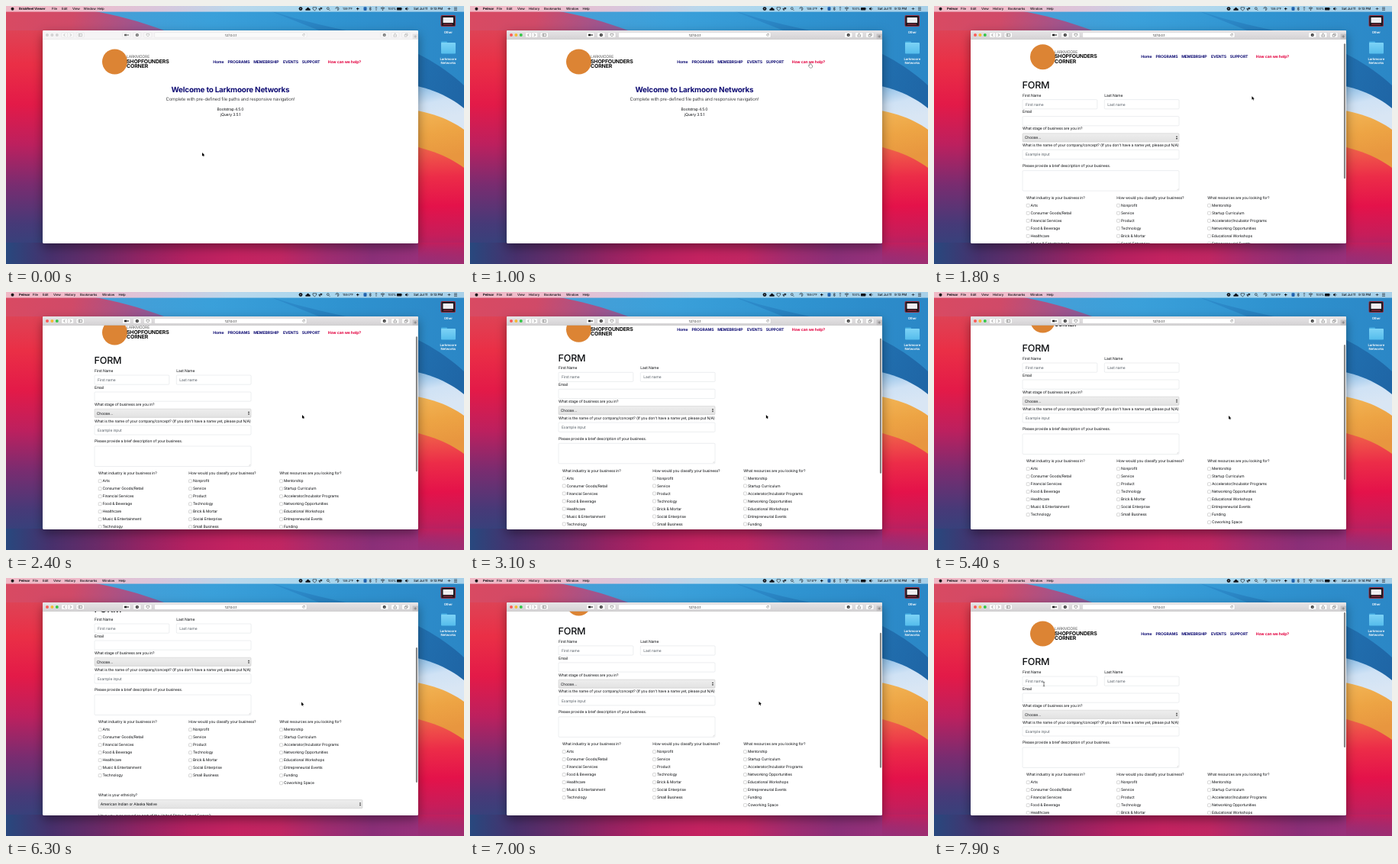
An HTML page with a canvas for the animation above (8000 ms loop, 600 px wide and 338 px high).

```html
<!DOCTYPE html>
<html lang="en">
<head>
<meta charset="utf-8">
<title>Form walkthrough</title>
<style>
html, body { margin: 0; width: 100%; height: 100%; overflow: hidden; background: #333; }
canvas { display: block; width: 600px; height: 338px; }
</style>
</head>
<body>
<canvas id="stage"></canvas>
<script>
const W = 600, H = 338, LOOP = 8000;
const canvas = document.getElementById('stage');
const ratio = window.devicePixelRatio || 1;
canvas.width = W * ratio;
canvas.height = H * ratio;
let ctx = canvas.getContext('2d');

const NAVY = '#0d0b72', INK = '#0c0e11', PINK = '#e3003f', GREY = '#596169';

function text(str, x, y, size, color = INK, weight = 400, align = 'left', track = -0.02) {
  ctx.font = `${weight} ${size}px Inter, "Open Sans", sans-serif`;
  ctx.letterSpacing = `${(track * size).toFixed(3)}px`;
  ctx.textRendering = 'geometricPrecision';
  ctx.textAlign = align;
  ctx.textBaseline = 'alphabetic';
  ctx.fillStyle = color;
  ctx.fillText(str, x, y + size * 0.36);
}

function box(x, y, w, h, r, fill, stroke, line = 0.4) {
  ctx.beginPath();
  ctx.roundRect(x, y, w, h, r);
  if (fill) { ctx.fillStyle = fill; ctx.fill(); }
  if (stroke) { ctx.strokeStyle = stroke; ctx.lineWidth = line; ctx.stroke(); }
}

function dot(x, y, r, fill) {
  ctx.beginPath();
  ctx.arc(x, y, r, 0, Math.PI * 2);
  ctx.fillStyle = fill;
  ctx.fill();
}

function path(d, color, width = 0.6) {
  ctx.strokeStyle = color;
  ctx.lineWidth = width;
  ctx.stroke(new Path2D(d));
}

function ramp(x0, y0, x1, y1, colors) {
  const g = ctx.createLinearGradient(x0, y0, x1, y1);
  colors.forEach((c, i) => g.addColorStop(i / (colors.length - 1), c));
  return g;
}

function shape(d, fill) {
  ctx.fillStyle = fill;
  ctx.fill(new Path2D(d));
}

// Keyed values: [time, value...], eased between neighbours
function keyed(keys, t) {
  let i = 0;
  while (i < keys.length - 2 && t >= keys[i + 1][0]) i++;
  const a = keys[i], b = keys[i + 1];
  const k = Math.min(1, Math.max(0, (t - a[0]) / (b[0] - a[0])));
  const e = k * k * (3 - 2 * k);
  return a.slice(1).map((v, n) => v + (b[n + 1] - v) * e);
}

function stepped(list, t) {
  return list.filter(s => s[0] <= t).pop()[1];
}

const scrollKeys = [[1500, 0], [2300, 20], [2600, 20], [3200, 24], [4500, 24], [5400, 36], [6300, 69], [6600, 69], [7500, 0]];
const mouseKeys = [[100, 257, 192], [900, 445, 75], [1400, 445, 75], [2200, 388, 161], [3000, 388, 161],
  [3800, 384.5, 160], [4600, 384.5, 160], [5300, 386, 162], [6300, 387, 162.5], [6900, 387, 162.5], [7800, 144, 139]];
const temps = [[0, '139.1°F'], [900, '138.0°F'], [2000, '159.0°F'], [3200, '137.8°F'], [5900, '138.2°F'], [7000, '137.8°F']];

function wallpaper() {
  // Sky, with a darker wave on the right
  ctx.fillStyle = ramp(100, 0, 600, 60, ['#4a9ed6', '#3aa0da', '#2f93d0', '#2b87c6']);
  ctx.fillRect(0, 0, W, H);
  shape('M330 0C380 20 440 30 480 40C530 54 570 76 600 104V150H480V60Z', ramp(340, 0, 600, 110, ['#2f8fce', '#2379b9', '#1f66a6']));
  // Warm hill on the left
  shape('M0 0H70C120 6 190 18 270 60V338H0Z', ramp(0, 0, 260, 50, ['#d94a62', '#d04a68', '#9c5590', '#5a79b8']));
  ctx.fillStyle = ramp(0, 24, 0, 338, ['#dc4658', '#ea2f46', '#e31a48', '#bd205e', '#7a2c70', '#463a78', '#28487e']);
  ctx.fillRect(0, 32, 60, 306);
  // Pale band, amber band and red slope on the right
  shape('M500 98C550 104 578 116 600 134V220H500Z', ramp(550, 104, 560, 150, ['#8fc0e8', '#cfe2f5', '#d9e6f4']));
  shape('M500 132C550 136 578 146 600 162V260H500Z', ramp(550, 136, 562, 200, ['#f2b455', '#eda444', '#e8963f']));
  shape('M500 178C550 184 578 196 600 212V338H500Z', ramp(565, 186, 570, 338, ['#f0604a', '#ec2c48', '#e4124a', '#c61d5a', '#8f2c74']));
  // Floor
  ctx.fillStyle = ramp(0, 0, 600, 0, ['#28487e', '#48306c', '#6a2a68', '#942363', '#b52060', '#c42260', '#c02662', '#a02c70', '#8a2f78', '#98307a', '#a52e70']);
  ctx.fillRect(0, 310, W, 28);
  ctx.fillStyle = ramp(0, 310, 0, 338, ['rgba(198,29,90,.9)', 'rgba(143,44,116,.3)']);
  ctx.fillRect(540, 310, 60, 28);
}

function desktopIcons() {
  box(570, 12.5, 18.5, 14, 1.2, '#1d1a22', '#a52a3c', 0.9);
  box(572.5, 15, 13.5, 7, 0.5, '#efedf0');
  box(573, 23, 12, 2, 0.5, '#70222f');
  text('Other', 579.3, 34.2, 4.3, '#fff', 600, 'center');
  box(570, 46.5, 8, 4, 1, '#49b2e5');
  box(570, 48, 19, 14.5, 1, ramp(0, 48, 0, 62, ['#7dd3f6', '#56bdec']));
  text('Larkmoore', 579.3, 69, 4.3, '#fff', 600, 'center');
  text('Networks', 579.3, 74, 4.3, '#fff', 600, 'center');
}

function statusIcons(t) {
  const c = '#10131a';
  dot(386, 3.6, 2.4, c);
  dot(386, 3.6, 0.7, '#d5e8f4');
  shape('M392.5 5.8Q391.8 3.6 393.8 3.5Q395.2 .2 397.2 3.2Q399.3 3.4 398.6 5.8Z', c);
  path('M402 1.8H406.6V4L404.3 6L402 4Z', c);
  path('M409.5 3.8H414M411.5 2.3L414.3 2.8M410 4.8L412 5.2', c, 1);
  path('M420.4 3.2A1.4 1.4 0 1 0 423.2 3.2A1.4 1.4 0 1 0 420.4 3.2M423 4.5L424.5 6', c);
  path('M431.8 3.6A2.1 2.1 0 1 1 434 5.7M434 2.3V3.8L435 4.4', c);
  text(stepped(temps, t), 441, 3.7, 4.1, c);
  path('M459 3.6H462.5M460.7 2V5.4', c, 1);
  box(468.5, 1.2, 4, 4.9, 1, '#2363ad');
  path('M477 1.3V5.9L478.6 4.6L475.7 2.5M475.7 4.7L478.6 2.6L477 1.3', c, 0.5);
  path('M485 1.4V6M484 2.4L485 1.4L486 2.4', c, 0.5);
  path('M490.8 2.9Q493.5 .7 496.2 2.9M491.8 4Q493.5 2.7 495.2 4', c, 0.7);
  dot(493.5, 5.2, 0.6, c);
  text('100%', 500.5, 3.7, 4.1, c);
  box(512, 1.9, 6.3, 3.5, 0.6, c);
  box(518.6, 3, 0.5, 1.3, 0, c);
  shape('M523 2.8H524L525.6 1.4V5.8L524 4.5H523Z', c);
  path('M526.6 2.4Q527.6 3.6 526.6 4.8', c, 0.5);
  text('Sat Jul 11', 534, 3.7, 4.4, c, 500);
  text(t < 7000 ? '9:13 PM' : '9:14 PM', 556, 3.7, 4.4, c, 500);
  path('M578.5 3.6H582.5M580.5 2V5.2', c, 0.6);
  path('M587 2H591M587 3.7H591M587 5.4H591', c, 0.6);
}

function menuBar(t, active) {
  ctx.fillStyle = ramp(0, 0, 600, 0, ['#f0b9c6', '#efbccb', '#d9c6dc', '#b9d8ec', '#aad7ee', '#a8d2ea', '#a8d0e8']);
  ctx.fillRect(0, 0, W, 7.6);
  dot(8.5, 3.7, 2, '#191919');
  const c = '#121217';
  text(active ? 'Pelmar' : 'BriskReel Viewer', 17, 3.7, 4.35, c, 700);
  const menus = active
    ? [['File', 35], ['Edit', 48], ['View', 62], ['History', 77], ['Bookmarks', 97], ['Window', 126], ['Help', 147.5]]
    : [['File', 60], ['Edit', 73], ['View', 87], ['Window', 101.5], ['Help', 119.5]];
  menus.forEach(([s, x]) => text(s, x, 3.7, 4.3, c, 500));
  statusIcons(t);
}

function toolbar(active) {
  ctx.fillStyle = active ? ramp(0, 32, 0, 44, ['#e7e5e7', '#d3d1d3']) : '#f5f4f5';
  ctx.fillRect(48, 32, 492, 11.7);
  ctx.fillStyle = active ? '#b5b3b5' : '#d7d6d7';
  ctx.fillRect(48, 43.4, 492, 0.4);
  const lights = active ? ['#fc5b57', '#f5b932', '#35c748'] : ['#d3d2d3', '#d3d2d3', '#d3d2d3'];
  lights.forEach((c, i) => dot(54 + i * 6.4, 38, 2, c));
  const face = active ? '#fafafa' : '#f7f7f7', rim = active ? '#c4c2c4' : '#dddcdd', c = active ? '#555' : '#999';
  [[72.5, 8], [80.7, 8], [92, 10.5], [152.5, 10.5], [166.5, 10.5], [180.5, 10.5], [490.5, 10.5], [504.5, 10.5], [518.5, 10.5]]
    .forEach(([x, w]) => box(x, 34.6, w, 6.7, 1.2, face, rim));
  box(194.5, 34.6, 199.5, 6.7, 1.2, active ? '#fff' : '#fafafa', rim);
  path('M77.2 36.3L75.7 38L77.2 39.7M84 36.3L85.5 38L84 39.7', c);
  path('M95 36.4H99.6V39.6H95ZM96.6 36.4V39.6', c, 0.5);
  const dark = active ? '#222' : '#666';
  box(155, 36.7, 3.4, 2.6, 0.4, dark);
  shape('M158.5 38L160.5 36.7V39.3Z', dark);
  dot(171.8, 38, 2.1, dark);
  path('M170.6 38H173M171.8 36.8V39.2', '#eee', 0.4);
  path('M184 36.4H187.6V38.2L185.8 40L184 38.2Z', c, 0.5);
  dot(495.7, 38, 2, dark);
  path('M495.7 36.8V39L494.9 38.3M495.7 39L496.5 38.3', '#fff', 0.45);
  path('M508.4 37.6H507.9V40H511.5V37.6H511M509.7 38.8V35.8L508.9 36.6M509.7 35.8L510.5 36.6', c, 0.45);
  path('M522.2 37.4H525V40H522.2ZM523.4 37.4V36.2H526.2V38.8H525', c, 0.45);
  text('127.0.0.1', 294.5, 38, 4.3, active ? '#222' : '#444', 400, 'center');
  path('M391.2 37A1.4 1.4 0 1 0 391.4 38.3M391.4 36.2V37.2H390.4', c, 0.45);
  box(532.6, 36.6, 7.4, 6.9, 0, active ? '#c4c2c4' : '#e4e3e4');
  path('M536.2 38.2V41.8M534.4 40H538', c, 0.5);
}

function header() {
  dot(142.5, 73, 16.5, '#dc8434');
  text('LARKMOORE', 158, 66.3, 5.1, '#333', 300, 'left', -0.03);
  text('SHOPFOUNDERS', 158, 72.2, 6.9, '#0c0c0c', 700, 'left', -0.02);
  text('CORNER', 158, 78.4, 6.9, '#0c0c0c', 700, 'left', -0.02);
  [['Home', 271.3], ['PROGRAMS', 290.6], ['MEMEBRSHIP', 324.2], ['EVENTS', 363], ['SUPPORT', 387.8]]
    .forEach(([s, x]) => text(s, x, 73, 5.1, NAVY, 700));
  text('How can we help?', 421.7, 73, 5.1, PINK, 700);
}

function home() {
  text('Welcome to Larkmoore Networks', 294, 109.7, 9.9, NAVY, 700, 'center');
  text('Complete with pre-defined file paths and responsive navigation!', 294, 121.7, 5.95, INK, 300, 'center');
  text('Bootstrap 4.5.0', 294, 134.8, 5.05, INK, 400, 'center');
  text('jQuery 3.5.1', 294, 142.4, 5.05, INK, 400, 'center');
}

function field(x, y, w, h, hint = '') {
  box(x, y, w, h, 1.2, '#fff', '#ced4da');
  text(hint, x + 4, y + 6.2, 4.95, GREY);
}

function select(x, y, w, value) {
  box(x, y, w, 11.2, 1.2, ramp(0, y, 0, y + 11.2, ['#eeeeee', '#e2e2e2']), '#b9b9b9');
  text(value, x + 2.8, y + 5.7, 4.95, INK);
  const ax = x + w - 3, ay = y + 5.6;
  shape(`M${ax - 1.2} ${ay - 0.6}h2.4l-1.2 -1.9zM${ax - 1.2} ${ay + 0.6}h2.4l-1.2 1.9z`, '#333');
}

const groups = [
  [121, 'What industry is your business in?', ['Arts', 'Consumer Goods/Retail', 'Financial Services', 'Food & Beverage', 'Healthcare', 'Music & Entertainment', 'Technology']],
  [239.3, 'How would you classify your business?', ['Nonprofit', 'Service', 'Product', 'Technology', 'Brick & Mortar', 'Social Enterprise', 'Small Business']],
  [358.3, 'What resources are you looking for?', ['Mentorship', 'Startup Curriculum', 'Accelerator/Incubator Programs', 'Networking Opportunities', 'Educational Workshops', 'Entrepreneurial Events', 'Funding', 'Coworking Space']]
];

function form() {
  const label = (s, x, y) => text(s, x, y, 4.97);
  text('FORM', 115.6, 109.7, 12.6, INK, 500);
  label('First Name', 116, 123.2);
  label('Last Name', 223.3, 123.2);
  field(116, 129, 97.8, 12.2, 'First name');
  field(223.3, 129, 97.8, 12.2, 'Last name');
  label('Email', 116, 145);
  field(116, 151, 205, 12.2);
  label('What stage of business are you in?', 116, 167);
  select(116, 173.2, 205, 'Choose...');
  label("What is the name of your company/concept? (If you don't have a name yet, please put N/A)", 116, 188.8);
  field(116, 194.8, 205, 12.2, 'Example input');
  label('Please provide a brief description of your business.', 116, 215.7);
  field(116, 222, 205, 26.5);
  path('M318.5 247.5L320.2 245.8M319.6 247.5L320.2 246.9', '#999', 0.35);
  groups.forEach(([x, title, items]) => {
    label(title, x, 257.6);
    items.forEach((s, i) => {
      const y = 267.7 + i * 10;
      box(x + 0.2, y - 2, 4, 4, 0.8, '#fff', '#a5a5a5', 0.45);
      label(s, x + 5.6, y);
    });
  });
  label('What is your ethnicity?', 121, 353.2);
  select(121, 359.6, 346, 'American Indian or Alaska Native');
  label('Have you ever served as part of the United States Armed Forces?', 121, 380.2);
}

function scrollbar(scroll) {
  box(536.9, 45 + scroll * 0.667, 2.2, 177, 1.1, 'rgba(70,70,70,.65)');
}

function pointer(x, y, kind) {
  ctx.save();
  ctx.translate(x, y);
  if (kind === 'arrow') {
    const d = 'M0 0V4.7L1.1 3.7L1.8 5.3L2.6 5L1.9 3.4H3.4Z';
    path(d, '#fff', 0.8);
    shape(d, '#000');
  } else if (kind === 'hand') {
    const d = 'M0 0Q.7 -.5 1 .3V2L3 2.5Q3.5 2.8 3.2 4.8L2.7 5.8H.3L-1.4 3.4Q-1.4 2.7 -.6 2.9L0 3.4Z';
    path(d, '#111', 0.8);
    shape(d, '#fff');
  } else {
    path('M-1.2 -2.7Q0 -2.7 0 -2V2Q0 2.7 -1.2 2.7M1.2 -2.7Q0 -2.7 0 -2M0 2Q0 2.7 1.2 2.7', '#222', 0.6);
  }
  ctx.restore();
}

const backdrop = document.createElement('canvas');
backdrop.width = canvas.width;
backdrop.height = canvas.height;

function paintBackdrop() {
  const main = ctx;
  ctx = backdrop.getContext('2d');
  ctx.scale(ratio, ratio);
  wallpaper();
  desktopIcons();
  ctx.shadowColor = 'rgba(0,0,0,.4)';
  ctx.shadowBlur = 14 * ratio;
  ctx.shadowOffsetY = 5 * ratio;
  box(48, 32, 492, 279, 2, '#fff');
  ctx = main;
}

function draw(t) {
  const active = t >= 500, onForm = t >= 1300;
  const [scroll] = keyed(scrollKeys, t);
  const [before] = keyed(scrollKeys, t - 500);
  const [mx, my] = keyed(mouseKeys, t);
  ctx.setTransform(1, 0, 0, 1, 0, 0);
  ctx.drawImage(backdrop, 0, 0);
  ctx.scale(ratio, ratio);
  menuBar(t, active);

  ctx.save();
  ctx.beginPath();
  ctx.roundRect(48, 32, 492, 279, 2);
  ctx.clip();
  ctx.fillStyle = '#fff';
  ctx.fillRect(48, 32, 492, 279);
  ctx.save();
  ctx.translate(0, -scroll);
  header();
  if (onForm) form(); else home();
  ctx.restore();
  // The bar shows only during and just after scrolling
  if (scroll !== before) scrollbar(scroll);
  toolbar(active);
  ctx.restore();

  const kind = t >= 850 && t < 1500 ? 'hand' : t >= 7700 ? 'beam' : 'arrow';
  pointer(mx, my, kind);
}

paintBackdrop();
const start = performance.now();
function tick() {
  draw((performance.now() - start) % LOOP);
  requestAnimationFrame(tick);
}
tick();
</script>
</body>
</html>
```
